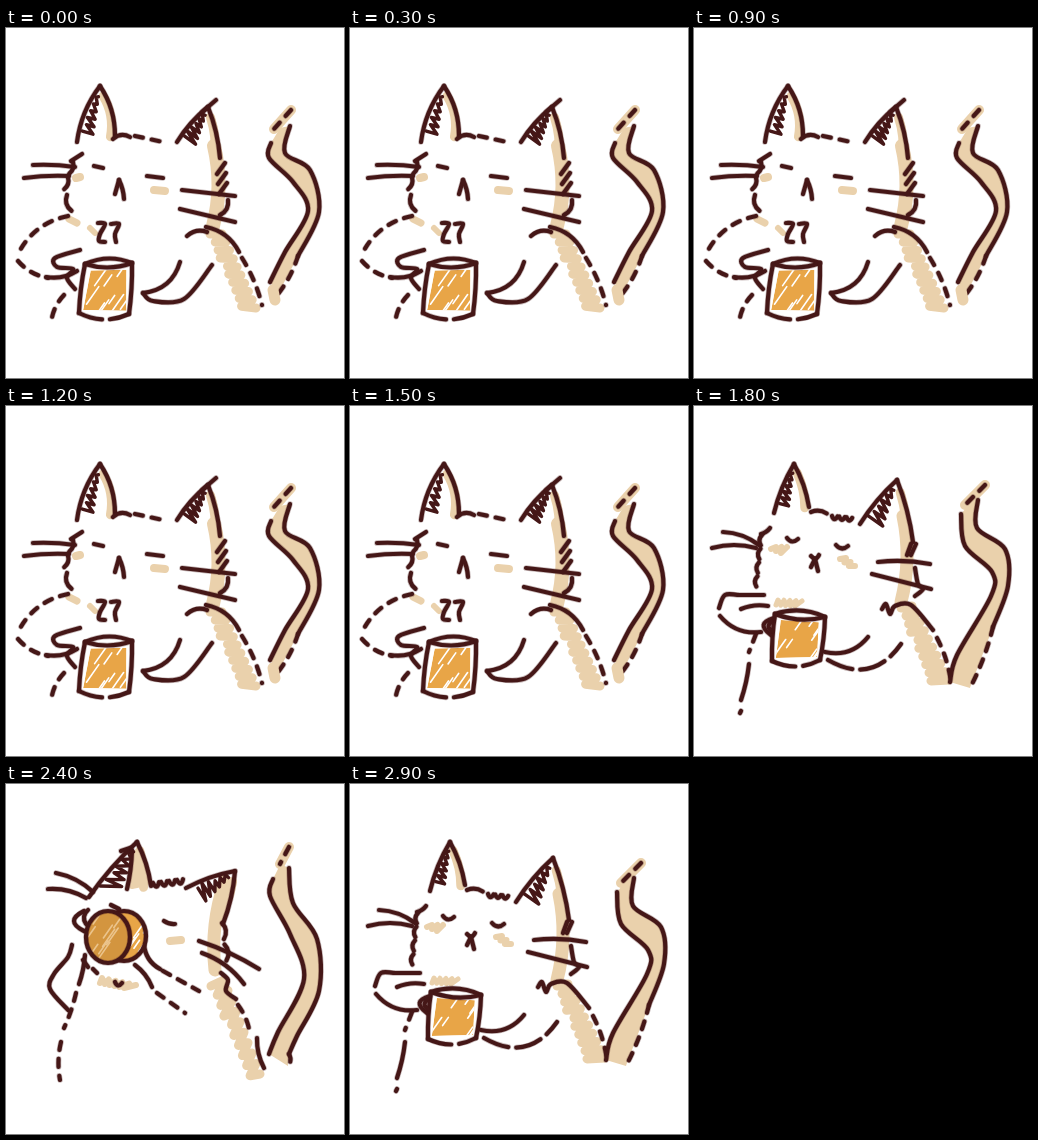
Animation of 338x350 px, one loop 3000 ms. Source, as an HTML page with a canvas:

```html
<!DOCTYPE html>
<html lang="en">
<head>
<meta charset="utf-8">
<style>
html, body { margin: 0; width: 100%; height: 100%; overflow: hidden; background: #fff; }
canvas { display: block; }
</style>
</head>
<body>
<canvas id="stage" width="338" height="350"></canvas>
<script>
const ctx = document.getElementById('stage').getContext('2d');
const BROWN = '#451717', TAN = '#ead1ac', ORANGE = '#e8a547', AMBER = '#d3953f';

let seed;
const random = () => (seed = seed * 16807 % 2147483647) / 2147483647;
const mix = (a, b, k) => [a[0] + (b[0] - a[0]) * k, a[1] + (b[1] - a[1]) * k];

// Arc from a to b whose middle bulges to the left of the direction of travel
function arc(a, b, bulge = 0) {
  const [dx, dy] = [b[0] - a[0], b[1] - a[1]];
  const reach = 2 * bulge / Math.hypot(dx, dy);
  const path = new Path2D();
  path.moveTo(...a);
  path.quadraticCurveTo((a[0] + b[0]) / 2 + dy * reach, (a[1] + b[1]) / 2 - dx * reach, ...b);
  return path;
}

// Smooth curve through key points
function curve(points, path = new Path2D()) {
  const at = i => points[Math.max(0, Math.min(points.length - 1, i))];
  path.lineTo(...points[0]);
  for (let i = 0; i < points.length - 1; i++) {
    const [a, b, c, d] = [at(i - 1), at(i), at(i + 1), at(i + 2)];
    path.bezierCurveTo(b[0] + (c[0] - a[0]) / 6, b[1] + (c[1] - a[1]) / 6,
      c[0] - (d[0] - b[0]) / 6, c[1] - (d[1] - b[1]) / 6, ...c);
  }
  return path;
}

function brush(path, color, width, dash = []) {
  ctx.setLineDash(dash);
  ctx.strokeStyle = color;
  ctx.lineWidth = width;
  ctx.stroke(path);
}

function ink(path, dash) {
  ctx.globalAlpha = 0.3;
  brush(path, BROWN, 5.6, dash);
  ctx.globalAlpha = 1;
  brush(path, BROWN, 4.2, dash);
}

const line = (a, b, bulge) => ink(arc(a, b, bulge));
const dashes = (a, b, bulge) => ink(arc(a, b, bulge), [8, 9]);
const blush = (a, b, width = 8) => brush(arc(a, b), TAN, width);

// Row of small tufts
function fur(a, b, count, bulge) {
  for (let i = 0; i < count; i++) line(mix(a, b, i / count), mix(a, b, (i + 0.75) / count), bulge);
}

// Zigzag between the edges a-b and c-d with uneven turns
function scribble(color, width, turns, [a, b], [c, d], rough = 0) {
  const path = new Path2D();
  for (let i = 0; i <= turns; i++) {
    path.lineTo(...mix(mix(a, b, i / turns), mix(c, d, i / turns), random() * rough));
    path.lineTo(...mix(c, d, i / turns));
  }
  brush(path, color, width);
}

const flank = (left, right) => scribble(TAN, 9, 9, left, right, 0.35);

// Tapered ear with light lining and dark scribbles
function ear(left, tip, right, bow, shade = 0.4) {
  brush(arc(mix(tip, right, 0.2), mix(right, left, 0.12), bow), TAN, 9);
  const inner = mix(left, right, shade);
  scribble(BROWN, 3.4, 5, [mix(left, tip, 0.2), mix(left, tip, 0.8)],
    [mix(inner, tip, 0.1), mix(inner, tip, 0.8)], 0.3);
  line(left, tip, bow);
  line(tip, right, bow);
}

// Crayon fill with diagonal gaps
function crayon(shape, color, gap, [x, y], size) {
  ctx.save();
  ctx.clip(shape);
  ctx.fillStyle = color;
  ctx.fill(shape);
  for (let i = 0; i < 9; i++) {
    const [px, py] = [x + (random() - 0.5) * size, y + (random() - 0.5) * size];
    const reach = 4 + random() * 5;
    brush(arc([px - reach * 0.7, py + reach], [px + reach * 0.7, py - reach]), gap, 1.6);
  }
  ctx.restore();
}

function mug(topLeft, topRight, bottomRight, bottomLeft) {
  const corners = [topLeft, topRight, bottomRight, bottomLeft];
  const middle = mix(topLeft, bottomRight, 0.54);
  const drink = new Path2D();
  corners.forEach((p, i) => drink.lineTo(...mix(middle, p, i < 2 ? 0.76 : 0.86)));
  crayon(drink, ORANGE, '#fff', middle, 40);
  line(topLeft, topRight, 5);
  line(topLeft, topRight, -4);
  line(topLeft, bottomLeft, -1);
  line(topRight, bottomRight, 1);
  ink(arc(bottomLeft, bottomRight, -6), [24, 8]);
}

// Two outlines with the fur between them, then a broken lower edge
function tail(left, right, tip, hem) {
  const shape = curve(left);
  curve([...right, hem].reverse(), shape);
  curve(tip.slice().reverse(), shape);
  ctx.fillStyle = TAN;
  ctx.fill(shape);
  brush(arc(...tip), TAN, 10);
  ink(curve(left));
  ink(curve(right));
  dashes(...tip);
  dashes(right[right.length - 1], hem, 2);
}

function sipReady() {
  brush(arc([208, 118], [207, 198], 5), TAN, 14);
  flank([[204, 206], [234, 278]], [[216, 206], [250, 280]]);
  blush([148, 162], [159, 163]);
  blush([70, 150], [74, 149]);
  blush([63, 191], [71, 195], 7);
  blush([84, 200], [89, 205], 6);

  ear([71, 114], [94, 58], [109, 108], 4);
  ear([171, 114], [202, 79], [214, 130], 2);
  line([196, 84], [210, 72]);
  line([107, 111], [124, 109], 3);
  dashes([129, 108], [162, 115]);
  for (let i = 0; i < 3; i++) line([219 + i, 135 + i * 10], [211 + i, 146 + i * 10]);
  line([222, 172], [214, 187], 3);
  line([76, 126], [65, 133]);
  fur([67, 134], [57, 165], 2, 2);
  fur([61, 167], [67, 188], 1, -3);

  line([27, 137], [69, 139], 1);
  line([18, 150], [63, 148], 1);
  line([88, 138], [97, 140]);
  line([141, 148], [157, 150]);
  line([113, 152], [109, 166]);
  line([113, 152], [118, 171], 1);
  line([176, 162], [229, 168]);
  line([174, 181], [229, 194]);

  line([181, 208], [201, 204], 3);
  line([200, 199], [233, 224], 5);
  dashes([236, 230], [256, 277], 2);
  dashes([62, 188], [11, 228], -8);
  dashes([12, 233], [42, 250], -3);
  line([40, 249], [71, 243], -3);
  ink(curve([[74, 222], [49, 230], [51, 239], [67, 241], [61, 250], [69, 261]]));
  dashes([58, 267], [45, 297], -3);
  line([174, 234], [137, 265], 8);
  ink(curve([[137, 265], [147, 273], [178, 271], [206, 237]]));

  ink(curve([[92, 195], [99, 196], [94, 206], [93, 213], [99, 214]]));
  ink(curve([[105, 196], [113, 196], [109, 206], [110, 214]]));
  mug([79, 236], [126, 235], [123, 286], [73, 285]);

  tail([[265, 115], [263, 130], [287, 154], [302, 183], [279, 224], [264, 254]],
    [[284, 98], [279, 125], [304, 142], [313, 184], [292, 228]],
    [[285, 82], [268, 101]], [272, 266]);
  blush([267, 262], [269, 272], 11);
}

function sipping() {
  brush(arc([209, 110], [207, 196], 5), TAN, 13);
  flank([[207, 202], [235, 275]], [[218, 200], [255, 274]]);
  scribble(TAN, 6, 2, [[77, 143], [87, 147]], [[82, 141], [93, 141]]);
  scribble(TAN, 6, 2, [[146, 153], [155, 160]], [[152, 152], [161, 160]]);
  scribble(TAN, 5, 4, [[82, 199], [101, 200]], [[84, 194], [108, 195]]);

  ear([80, 107], [100, 58], [115, 101], 2);
  ear([166, 118], [203, 74], [219, 136], 2);
  fur([117, 106], [138, 108], 1, 2);
  fur([138, 110], [160, 112], 3, -3);
  for (let i = 0; i < 2; i++) line([217 + i * 5, 138], [213 + i * 4, 149]);
  ink(curve([[221, 162], [224, 178], [229, 183], [221, 190]]));
  line([76, 122], [67, 128], 1);
  fur([68, 129], [62, 184], 4, -2);

  line([29, 126], [65, 139], 3);
  line([18, 142], [62, 142], 3);
  line([93, 132], [104, 133], -3);
  line([142, 139], [154, 140], -3);
  line([117, 150], [125, 149], -3);
  line([121, 153], [117, 161]);
  line([121, 153], [124, 165]);
  line([184, 156], [236, 158], 2);
  line([178, 168], [237, 183]);

  ink(curve([[188, 203], [192, 198], [196, 208], [201, 200], [217, 199], [239, 224]]));
  dashes([243, 232], [257, 276], 2);
  ink(curve([[70, 189], [46, 189], [31, 189], [25, 202]]));
  line([74, 200], [47, 203], -2);
  line([26, 210], [67, 226], -6);
  dashes([62, 228], [55, 246]);
  line([55, 258], [47, 294], 1);
  line([47, 305], [46, 307]);
  line([131, 246], [174, 231], -7);
  ink(arc([134, 254], [207, 238], -17), [26, 8]);

  mug([81, 208], [131, 211], [126, 254], [78, 255]);
  line([80, 212], [77, 229], -9);
  line([77, 216], [78, 225], -3);

  tail([[267, 108], [271, 140], [298, 166], [297, 190], [263, 249], [256, 276]],
    [[284, 94], [283, 122], [311, 143], [314, 180], [299, 221]],
    [[291, 79], [271, 99]], [276, 282]);
}

function gulping() {
  brush(arc([219, 97], [209, 186], -5), TAN, 13);
  flank([[205, 202], [243, 292]], [[218, 196], [254, 290]]);
  scribble(TAN, 6, 6, [[129, 70], [126, 102]], [[131, 68], [140, 99]]);
  blush([164, 157], [175, 156]);
  scribble(TAN, 6, 5, [[94, 199], [118, 204]], [[96, 194], [130, 201]]);

  ear([83, 113], [131, 58], [145, 102], 2, 0.5);
  ear([180, 104], [229, 87], [217, 140], 2, 0.45);
  line([115, 67], [124, 64]);
  line([126, 66], [121, 105], 1);
  fur([147, 99], [179, 95], 4, -4);
  fur([216, 139], [221, 182], 2, 3);

  line([50, 89], [87, 108], 3);
  line([42, 105], [80, 114], 3);
  line([158, 137], [169, 140], -1);
  line([87, 185], [91, 189]);
  line([109, 198], [116, 199], -3);
  line([193, 157], [253, 185], 2);
  line([196, 169], [238, 200], 4);

  ink(curve([[66, 161], [62, 173], [48, 190], [44, 205], [62, 226]]));
  line([79, 171], [73, 200], 1);
  line([77, 176], [82, 183]);
  dashes([70, 209], [58, 244], 1);
  dashes([55, 258], [54, 296], -2);
  line([138, 160], [154, 185], -4);
  dashes([157, 187], [193, 207]);
  line([129, 181], [146, 203], 2);
  dashes([151, 209], [179, 229]);
  ink(curve([[215, 189], [222, 196], [220, 207], [230, 215]]));
  dashes([232, 221], [244, 250], 2);
  line([251, 254], [258, 284], -2);

  const side = new Path2D(), mouth = new Path2D();
  side.ellipse(118, 152, 22, 25, 0, 0, 7);
  mouth.ellipse(102, 153, 22, 26, 0, 0, 7);
  crayon(side, ORANGE, '#fff', [134, 152], 22);
  ink(side);
  crayon(mouth, AMBER, '#ebc48c', [100, 152], 36);
  ink(mouth);
  line([105, 121], [113, 125]);
  line([78, 127], [78, 147], -10);
  line([82, 126], [80, 140], -3);

  tail([[267, 95], [264, 112], [284, 150], [298, 195], [272, 248], [263, 270]],
    [[283, 84], [287, 119], [311, 155], [313, 207], [291, 252], [283, 270]],
    [[283, 63], [274, 80]], [282, 282]);
}

const LOOP = 3000;
const timeline = [[2700, sipping], [2100, gulping], [1800, sipping], [0, sipReady]];
const start = performance.now();
let shown = null;

function draw(now) {
  const t = Math.max(0, now - start) % LOOP;
  const pose = timeline.find(([from]) => t >= from)[1];
  if (pose !== shown) {
    shown = pose;
    seed = 11;
    ctx.fillStyle = '#fff';
    ctx.fillRect(0, 0, 338, 350);
    pose();
  }
  requestAnimationFrame(draw);
}

ctx.lineCap = ctx.lineJoin = 'round';
draw(start);
</script>
</body>
</html>
```
